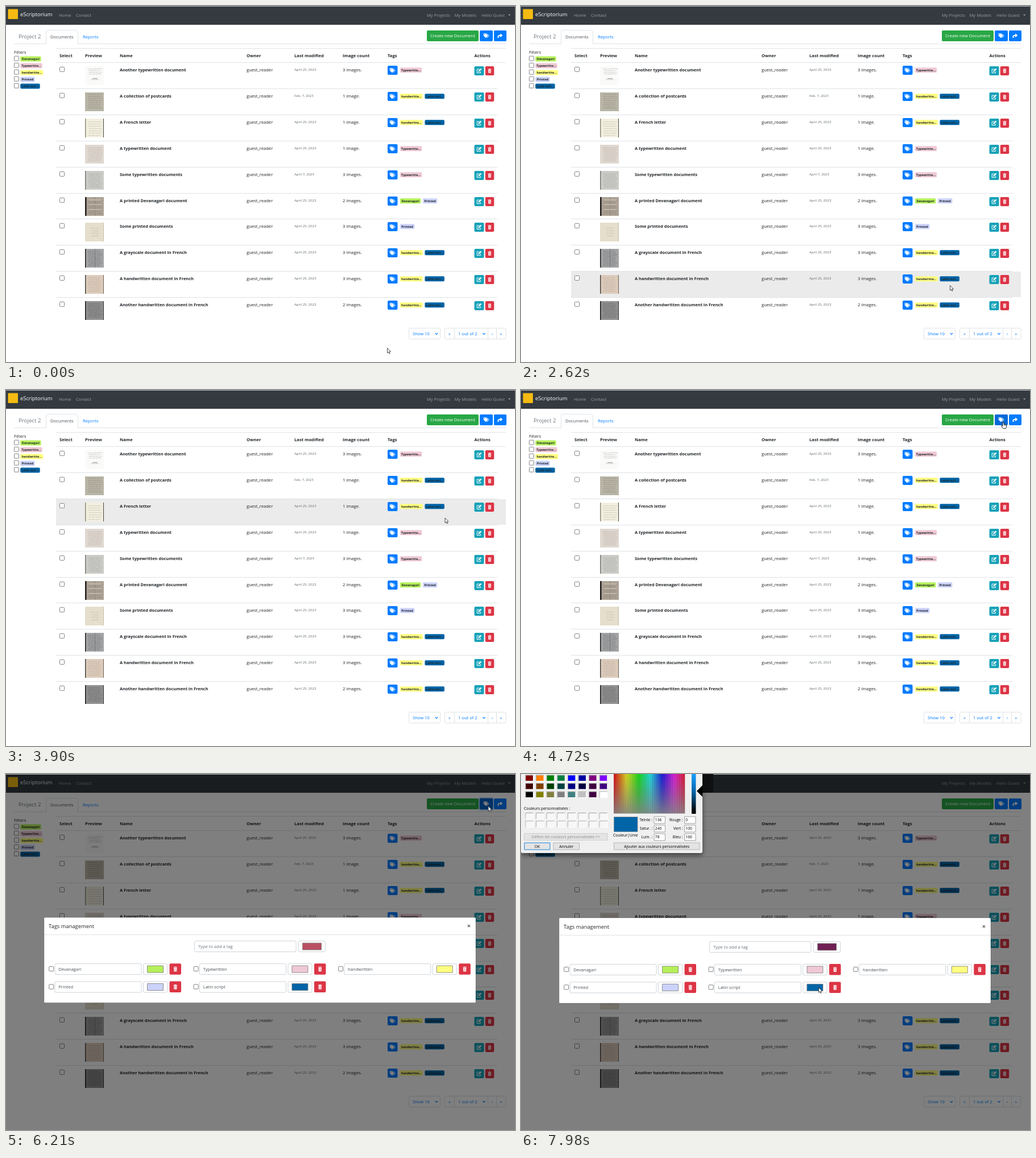
These frames come from a looping animation (895x626 px, 8000 ms). An HTML page with a canvas:

```html
<!DOCTYPE html>
<html lang="en">
<head>
<meta charset="utf-8">
<title>Document tags</title>
<style>
html, body { margin: 0; width: 100%; height: 100%; overflow: hidden; background: #fff; }
canvas { display: block; width: 895px; height: 626px; }
</style>
</head>
<body>
<canvas id="stage" width="895" height="626"></canvas>
<script>
const ctx = document.getElementById('stage').getContext('2d');
const LOOP = 8000;
const FONT = '"Open Sans", "Noto Sans", sans-serif';
const BLUE = '#007bff', RED = '#dc3545', TEAL = '#17a2b8', INK = '#212529', LINE = '#dee2e6', GRAY = '#6c757d';

const TAGS = {
  D: { name: 'Devanagari', short: 'Devanagari', color: '#b5f05a', width: 36.5 },
  T: { name: 'Typewritten', short: 'Typewritte...', color: '#efc9d5', width: 38.5 },
  H: { name: 'handwritten', short: 'handwritte...', color: '#ffff80', width: 40 },
  P: { name: 'Printed', short: 'Printed', color: '#ccd3fa', width: 25.5 },
  L: { name: 'Latin script', short: 'Latin scri...', color: '#0064a6', width: 34.5 }
};

const DOCS = [
  ['Another typewritten document', 'April 25, 2023', 3, 'T'],
  ['A collection of postcards', 'Feb. 7, 2023', 1, 'HL'],
  ['A French letter', 'April 25, 2023', 1, 'HL'],
  ['A typewritten document', 'April 25, 2023', 1, 'T'],
  ['Some typewritten documents', 'April 7, 2023', 3, 'T'],
  ['A printed Devanagari document', 'April 25, 2023', 2, 'DP'],
  ['Some printed documents', 'April 25, 2023', 3, 'P'],
  ['A grayscale document in French', 'April 25, 2023', 3, 'HL'],
  ['A handwritten document in French', 'April 25, 2023', 3, 'HL'],
  ['Another handwritten document in French', 'April 25, 2023', 2, 'HL']
];

// paper, ink, left edge, right edge, first line, last line, line pitch
const PAPERS = [
  ['#fafaf9', '#bbb', '', '', 4, 15, 3],
  ['#b9b5a6', '#8f8a7c', '', '', 3, 30, 3.4],
  ['#f2efdf', '#c3bfac', '#8d8a7c', '#444', 5, 30, 4],
  ['#ded8cf', '#c2b4b0', '', '', 4, 30, 2.4],
  ['#cbcbc7', '#adadaa', '#777', '', 4, 29, 2.2],
  ['#ada396', '#91877b', '#1d1b1a', '', 5, 30, 2],
  ['#e6decd', '#bfb5a2', '', '#c9bfab', 9, 26, 4.5],
  ['#a3a4a5', '#7b7c7e', '#1b1b1c', '', 3, 31, 2],
  ['#dccbbb', '#bcaa9c', '#44403c', '#6a6259', 4, 30, 3],
  ['#8f8f8f', '#646464', '#151515', '#333', 4, 30, 2.6]
];

// start, end, steps, x, y
const MOVES = [
  [550, 1390, 7, 738.5, 478.5], [1510, 1510, 1, 738, 476],
  [1640, 2090, 4, 769, 477], [2620, 3040, 4, 676, 569],
  [3630, 3630, 1, 674, 515.5], [3750, 3900, 2, 772, 225],
  [4180, 4720, 5, 848, 56.5], [6420, 6560, 2, 609, 243],
  [6810, 7380, 5, 523.5, 375.5]
];
const MODAL_STEPS = [5710, 5830, 5980, 6210, 6420];

const clamp = v => Math.max(0, Math.min(1, v));
const rowTop = i => Math.round(99.3 + 45.85 * i);

function random(seed) {
  return () => (seed = (seed * 16807) % 2147483647) / 2147483647;
}

function text(s, x, y, color = INK, size = 7.6, weight = 400, align = 'left') {
  ctx.font = `${weight} ${size}px ${FONT}`;
  ctx.fillStyle = color;
  ctx.textAlign = align;
  ctx.fillText(s, x, y);
}

function rect(x, y, w, h, fill) {
  ctx.fillStyle = fill;
  ctx.fillRect(x, y, w, h);
}

function box(x, y, w, h, r, fill, stroke, width = 1) {
  ctx.beginPath();
  ctx.roundRect(x, y, w, h, r);
  if (fill) { ctx.fillStyle = fill; ctx.fill(); }
  if (stroke) { ctx.strokeStyle = stroke; ctx.lineWidth = width; ctx.stroke(); }
}

function poly(points, fill, stroke, width = 1, closed = true) {
  ctx.beginPath();
  points.forEach(([x, y]) => ctx.lineTo(x, y));
  if (closed) ctx.closePath();
  if (fill) { ctx.fillStyle = fill; ctx.fill(); }
  if (stroke) { ctx.strokeStyle = stroke; ctx.lineWidth = width; ctx.stroke(); }
}

function at(x, y, draw) {
  ctx.save();
  ctx.translate(x, y);
  draw();
  ctx.restore();
}

const checkbox = (x, y) => box(x, y, 8, 8, 1, '#fff', '#767676', 0.9);

function tagsIcon(x, y, hole) {
  at(x, y, () => {
    poly([[-5, -4], [-1, -4], [3, 0], [-1, 4], [-5, 0]], '#fff');
    poly([[0.6, -3.9], [4.6, 0], [0.8, 3.9]], null, '#fff', 1, false);
    box(-4, -3, 1.5, 1.5, 1, hole);
  });
}

function trashIcon(x, y, k = 1) {
  at(x, y, () => {
    ctx.scale(k, k);
    rect(-3.2, -3.6, 6.4, 1, '#fff');
    rect(-1.2, -4.3, 2.4, 1, '#fff');
    poly([[-2.8, -2], [2.8, -2], [2.4, 4.2], [-2.4, 4.2]], '#fff');
    for (const dx of [-1.3, 0, 1.3]) rect(dx - 0.2, -1, 0.4, 4, RED);
  });
}

function editIcon(x, y) {
  at(x, y, () => {
    poly([[1, -2.8], [-3.6, -2.8], [-3.6, 3.6], [2.6, 3.6], [2.6, 1]], null, '#fff', 1, false);
    poly([[-1.6, 1.8], [-1.3, 0], [3, -4.2], [4.5, -2.7], [0.2, 1.5]], '#fff');
  });
}

function shareIcon(x, y) {
  at(x, y, () => {
    poly([[0.5, -4], [4.8, -0.5], [0.5, 3]], '#fff');
    ctx.beginPath();
    ctx.moveTo(1, -0.6);
    ctx.quadraticCurveTo(-4.5, -0.8, -3, 3.8);
    ctx.strokeStyle = '#fff';
    ctx.lineWidth = 2;
    ctx.stroke();
  });
}

const chevron = (x, y) => poly([[x - 2.3, y - 1.2], [x, y + 1.2], [x + 2.3, y - 1.2]], null, BLUE, 1.1, false);

function badge(tag, x, y) {
  box(x, y - 4.5, tag.width, 9, 2, tag.color);
  text(tag.short, x + tag.width / 2, y + 2, INK, 5.5, 700, 'center');
}

function thumbnail(i, x, y) {
  const [paper, ink, left, right, first, last, pitch] = PAPERS[i];
  const rnd = random(91 + i * 517);
  rect(x, y, 33, 33, paper);
  if (i === 5 || i === 7) rect(x + 17, y, 1, 33, ink);
  for (let ly = first; ly < last; ly += pitch) {
    const start = i === 6 ? 10 + rnd() * 4 : 5 + rnd() * 2;
    const end = i === 6 ? 24 : 26 + rnd() * 5;
    for (let lx = start; lx < end;) {
      const w = 1 + rnd() * 4;
      rect(x + lx, y + ly + rnd() * 0.5, Math.min(w, end - lx), 0.8, ink);
      lx += w + 0.8;
    }
  }
  if (i === 0) {
    rect(x + 13, y + 21, 9, 0.8, '#777');
    rect(x + 10, y + 23, 14, 0.8, '#bbb');
  }
  if (i === 5) for (const b of [4, 12, 21]) rect(x + 6, y + b, 23, 2, '#c0b6a8');
  if (left) rect(x, y, i === 5 ? 2.5 : 1.5, 33, left);
  if (right) rect(x + 32, y, 1, 33, right);
}

function navbar() {
  rect(0, 0, 895, 33, '#343a40');
  rect(0, 0, 895, 1, '#b5b7b9');
  box(3.5, 5.5, 17.5, 17.5, 1, '#f5bb13');
  text('eScriptorium', 25, 18.3, '#fff', 9.4);
  const items = [['Home', 93], ['Contact', 123], ['My Projects', 740], ['My Models', 788.5], ['Hello Guest', 836]];
  items.forEach(([s, x]) => text(s, x, 18.7, '#999c9f'));
  poly([[883, 14.8], [887.4, 14.8], [885.2, 17.2]], '#999c9f');
}

function toolbar(hot, pressed) {
  rect(14, 66, 865, 1, LINE);
  text('Project 2', 22, 57.3, GRAY, 9.7);
  rect(71, 62, 55, 5, '#fff');
  poly([[70.5, 66.5], [70.5, 44.5], [72.5, 42.5], [124.5, 42.5], [126.5, 44.5], [126.5, 66.5]], null, LINE, 1, false);
  text('Documents', 78, 56.5, '#495057');
  text('Reports', 135, 56.5, BLUE);
  box(740, 43, 91, 19, 2, '#28a745');
  text('Create new Document', 785.4, 55.2, '#fff', 7.6, 400, 'center');
  const tint = pressed ? '#0062cc' : hot ? '#0069d9' : BLUE;
  if (pressed) box(831.6, 41.6, 25.8, 21.8, 3, '#85bfff');
  box(833, 43, 23, 19, 2, tint);
  tagsIcon(844.7, 52.3, tint);
  box(858, 43, 22, 19, 2, BLUE);
  shareIcon(868.6, 52.3);
}

function filters() {
  text('Filters', 14, 83.6);
  Object.values(TAGS).forEach((tag, i) => {
    checkbox(14.5, 88.2 + 12 * i);
    badge(tag, 25.2, 93 + 12 * i);
  });
}

function table(hovered) {
  rect(88, 74, 791, 1, LINE);
  rect(88, 99, 791, 1, LINE);
  const heads = [['Select', 94], ['Preview', 139], ['Name', 200], ['Owner', 423], ['Last modified', 507],
    ['Image count', 592], ['Tags', 671], ['Actions', 823.5]];
  heads.forEach(([s, x]) => text(s, x, 90, INK, 7.6, 700));

  DOCS.forEach(([name, date, images, tags], i) => {
    const y = rowTop(i);
    if (i === hovered) rect(88, y + 1, 791, 45, '#ebebeb');
    if (i) rect(88, y, 776, 1, LINE);
    checkbox(94.5, y + 8.4);
    thumbnail(i, 139, y + 7);
    text(name, 200, y + 15.6, INK, 7.45, 700);
    text('guest_reader', 423, y + 15.6);
    text(date, 507, y + 15.4, '#5f676e', 6.05);
    text(images + (images > 1 ? ' images.' : ' image.'), 592, y + 15.6);
    box(671, y + 6, 17.5, 16, 2, BLUE);
    tagsIcon(679.8, y + 14.2, BLUE);
    let x = 692.8;
    for (const key of tags) {
      badge(TAGS[key], x, y + 13.8);
      x += TAGS[key].width + 3.6;
    }
    box(823.5, y + 7, 17, 16, 2, TEAL);
    editIcon(831.8, y + 15);
    box(842.7, y + 7, 15.5, 16, 2, RED);
    trashIcon(850.4, y + 15, 0.9);
  });
}

function pager() {
  box(708.5, 566.5, 55, 19, 2, '#fff', LINE);
  text('Show 10', 715, 579, BLUE);
  chevron(757, 576.3);
  box(771.5, 566.5, 107.5, 19, 2, '#fff', LINE);
  for (const x of [788, 847, 862]) rect(x, 567, 1, 18, LINE);
  text('1 out of 2', 795, 579, BLUE);
  chevron(840.5, 576.3);
  [['«', 780], ['›', 855], ['»', 870.5]].forEach(([s, x]) => text(s, x, 578.6, BLUE, 7.6, 400, 'center'));
}

function swatch(x, y, w, color) {
  box(x, y, w, 19, 2, '#fff', '#ced4da');
  box(x + 7, y + 3.5, w - 14, 12, 0, color, '#777', 0.8);
}

function modal(alpha, dy, newColor, active) {
  ctx.globalAlpha = alpha;
  at(0, dy, () => {
    box(67, 253, 759, 150, 1.5, '#fff', 'rgba(0,0,0,.3)', 0.6);
    rect(67, 283, 759, 1, LINE);
    text('Tags management', 75, 272.3, INK, 9.4);
    text('×', 814, 272, '#555', 11, 700, 'center');
    box(331.5, 294.5, 178.5, 19, 2, '#fff', '#ced4da');
    text('Type to add a tag', 338, 307, GRAY);
    swatch(514.5, 294.5, 47, newColor);
    Object.values(TAGS).forEach((tag, i) => {
      const x = 254.4 * (i % 3), y = 334 + 31.4 * Math.floor(i / 3);
      checkbox(75.7 + x, y + 5.5);
      box(86 + x, y + 0.5, 152, 19, 2, '#fff', '#ced4da');
      text(tag.name, 92.3 + x, y + 12.7, '#495057');
      if (active && i === 4) box(240.5 + x, y - 0.8, 44, 21.6, 3, '#bfdeff');
      swatch(241.5 + x, y + 0.5, 42, tag.color);
      box(287.5 + x, y, 20.5, 19.5, 2, RED);
      trashIcon(297.8 + x, y + 9.8);
    });
  });
  ctx.globalAlpha = 1;
}

function dialogButton(label, x, y, w, border = '#adadad', color = '#000') {
  box(x, y, w, 12, 0, '#e4e4e4', border, 0.9);
  text(label, x + w / 2, y + 8.6, color, 6.8, 400, 'center');
}

function spectrum() {
  const cols = 32, w = 125 / cols;
  for (let i = 0; i < cols; i++) {
    const g = ctx.createLinearGradient(0, 0, 0, 70);
    const hue = i * 360 / cols;
    g.addColorStop(0, `hsl(${hue},78%,46%)`);
    g.addColorStop(0.5, `hsl(${hue},45%,47%)`);
    g.addColorStop(1, `hsl(${hue},8%,50%)`);
    rect(163 + i * w, 0, w + 0.3, 69.5, g);
  }
  const lum = ctx.createLinearGradient(0, 0, 0, 70);
  lum.addColorStop(0, '#1a9fff');
  lum.addColorStop(0.45, '#0064a6');
  lum.addColorStop(0.95, '#000');
  rect(300, 0, 7.5, 70, lum);
}

function colorDialog(alpha) {
  ctx.globalAlpha = alpha;
  rect(319, 0, 19, 33, '#0e1012');
  ctx.save();
  ctx.shadowColor = 'rgba(0,0,0,.5)';
  ctx.shadowBlur = 9;
  ctx.shadowOffsetY = 4;
  box(0, -6, 319, 145, 3, '#f0f0f0');
  ctx.restore();

  const palette = [
    ['#800000', '#ff8000', '#008000', '#008040', '#0000ff', '#0000a0', '#800080', '#8000ff'],
    ['#400000', '#804000', '#004000', '#004040', '#000080', '#000040', '#400040', '#400080'],
    ['#000', '#808000', '#808040', '#808080', '#408080', '#c0c0c0', '#400040', '#fff']
  ];
  const cell = (col, y, color) => {
    const x = 8 + 18.6 * col;
    rect(x - 0.5, y - 0.5, 14, 11, '#a0a0a0');
    rect(x + 0.5, y + 0.5, 13.5, 10.5, '#fff');
    rect(x + 0.5, y + 0.5, 12.5, 9.5, color);
  };
  palette.forEach((row, r) => row.forEach((c, i) => cell(i, 2 + 14.5 * r, c)));
  for (const y of [68.5, 83]) for (let i = 0; i < 8; i++) cell(i, y, '#f7f7f7');
  text('Couleurs personnalisées :', 5, 62.6, '#000', 6.8);
  dialogButton('Définir les couleurs personnalisées >>', 5.5, 104.5, 146.5, '#ccc', '#8a8a8a');
  dialogButton('OK', 6, 121, 45, '#0078d7');
  dialogButton('Annuler', 57, 121, 45.5);
  dialogButton('Ajouter aux couleurs personnalisées', 163.5, 121, 150.5);

  spectrum();
  poly([[309, 30], [319, 20], [319, 40]], '#000');
  box(163.5, 75.5, 41.5, 26, 0, '#0064a6', '#888', 0.7);
  text('Couleur|Unie', 162, 110.3, '#000', 6.8);
  const fields = [
    ['Teinte :', 136, 'Rouge :', 0], ['Satur. :', 240, 'Vert :', 100], ['Lum. :', 78, 'Bleu :', 166]
  ];
  fields.forEach(([a, av, b, bv], i) => {
    const y = 75 + 15 * i;
    [[a, av, 231], [b, bv, 284.5]].forEach(([label, value, x]) => {
      text(label, x, y + 8.4, '#000', 6.8, 400, 'right');
      box(x + 3, y, 19.5, 12, 0, '#fff', '#8a8a8a', 0.8);
      text(value, x + 4.8, y + 8.4, '#000', 6.8);
    });
  });
  ctx.globalAlpha = 1;
}

function pointer(t) {
  let x = 670.5, y = 601.5;
  for (const [start, end, steps, tx, ty] of MOVES) {
    if (t < start) break;
    const gap = (end - start) / Math.max(1, steps - 1) || 1;
    let p = Math.min(steps, Math.floor((t - start) / gap + 1e-6) + 1) / steps;
    if (steps > 2) p = p * p * (3 - 2 * p);
    x += (tx - x) * p;
    y += (ty - y) * p;
  }
  return { x, y };
}

function drawPointer({ x, y }, hand) {
  ctx.lineJoin = 'round';
  at(x, y, () => {
    if (hand) {
      poly([[-1, 0.5], [0, -0.3], [1, 0.5], [1.2, 4], [4.5, 4.6], [5.8, 5.6], [5.6, 8.6], [4.4, 11.2],
        [-0.2, 11.2], [-3.4, 7.2], [-2.8, 6.2], [-1, 7]], '#fff', '#111', 0.9);
      for (const dx of [1.2, 2.7, 4.1]) rect(dx, 4.6, 0.5, 2, '#333');
    } else {
      poly([[0, 0], [0, 8.6], [1.9, 6.9], [3.3, 9.9], [4.6, 9.3], [3.4, 6.4], [6, 6.2]], '#fff', '#222', 0.8);
    }
  });
  ctx.lineJoin = 'miter';
}

function draw(t) {
  const cursor = pointer(t);
  const { x, y } = cursor;
  const live = t < 5830;
  const inTable = live && x > 88 && x < 879;
  const row = inTable ? DOCS.findIndex((_, i) => y >= rowTop(i) && y < rowTop(i + 1)) : -1;
  const onTools = live && y > 42 && y < 62 && x > 739;
  const local = y - rowTop(Math.max(row, 0));
  const onRowButton = row >= 0 && local > 2 && local < 23 && ((x > 671 && x < 689) || (x > 823 && x < 858));

  rect(0, 0, 895, 626, '#fff');
  navbar();
  toolbar(onTools && x > 833 && x < 856, t >= 5710 && t < 6420);
  filters();
  table(row);
  pager();

  if (t >= 5310 && t < 5710) {
    box(847.5, 70.5, 50, 14, 0, '#fff', '#767676', 0.8);
    text('Manage tags', 851, 80, '#444', 6.3);
  }
  const step = MODAL_STEPS.filter(s => s <= t).pop() || 0;
  if (step) {
    rect(0, 1, 895, 625, `rgba(0,0,0,${0.5 * clamp((step - 5770) / 150)})`);
    const shown = clamp((step - 5900) / 150);
    const slide = Math.pow(1 - clamp((step - 5900) / 330), 1.2);
    if (shown) modal(shown, -25 * slide, t < 7680 ? '#b85062' : '#6f1f53', t >= 7680 && t < 7830);
  }
  if (t >= 7830) colorDialog(t < 7980 ? 0.6 : 1);
  drawPointer(cursor, onTools || onRowButton);
}

const began = performance.now();
function tick() {
  draw((performance.now() - began) % LOOP);
  requestAnimationFrame(tick);
}
tick();
</script>
</body>
</html>
```
